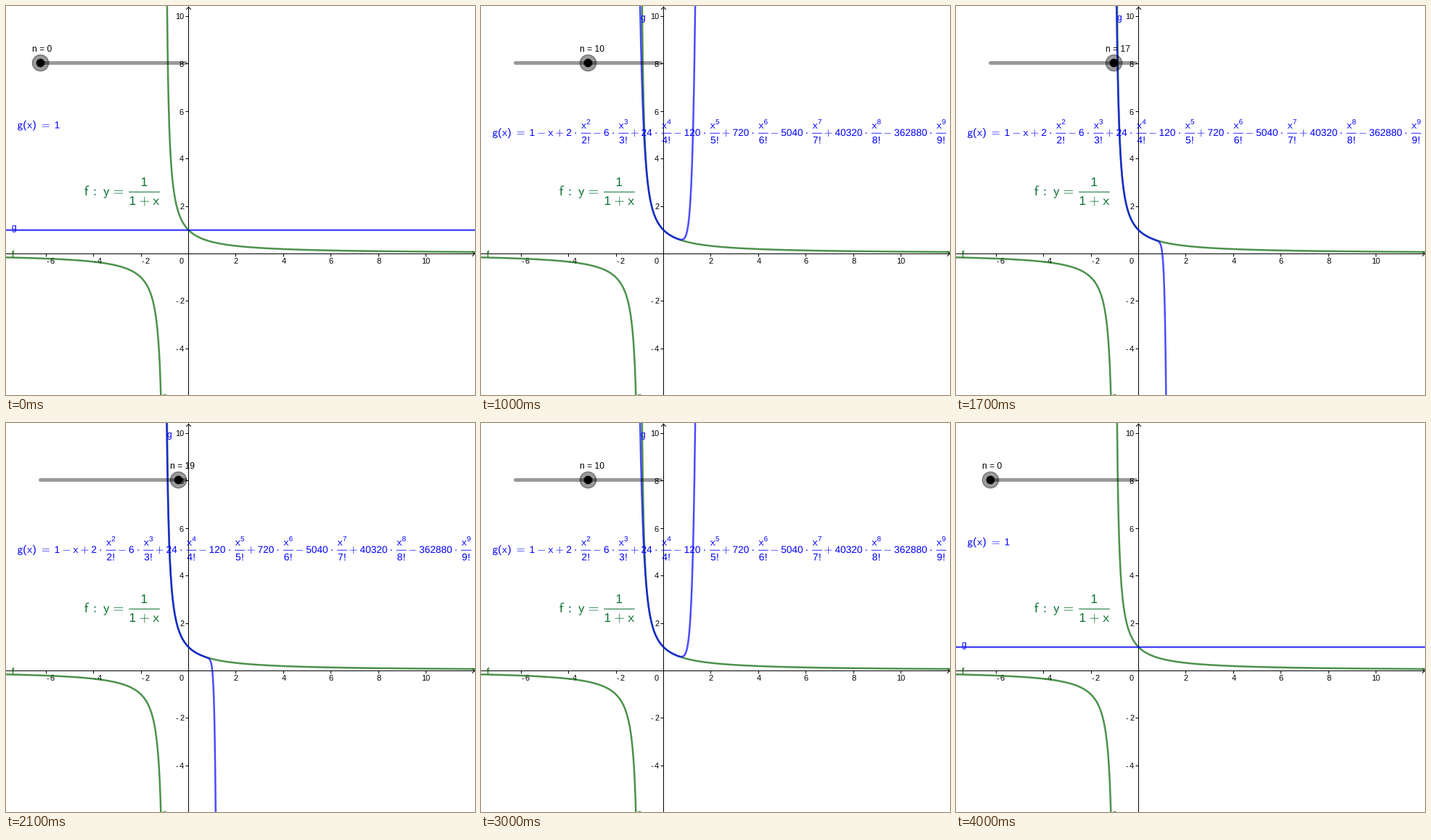
Recreate the animation shown at these times as a matplotlib script. Size 646x536 px, loop 4.1 s.

```python
import math

import matplotlib.pyplot as plt
import numpy as np
from matplotlib.animation import FuncAnimation
from matplotlib.patches import Circle, PathPatch
from matplotlib.textpath import TextPath
from matplotlib.transforms import Affine2D

plt.rcParams["mathtext.fontset"] = "cm"
plt.rcParams["font.family"] = "Liberation Sans"
plt.rcParams["path.snap"] = False

W, H, DPI = 646, 536, 100
PT = 72 / DPI                      # points per pixel
OX, OY, UNIT = 251.5, 341.5, 32.71  # origin and pixels per unit
N_MAX, LAST_TERM = 20, 9
GREEN, BLUE = (0, 100 / 255, 0), (0, 0, 1)
LABEL_GREEN = "#0b7030"

fig = plt.figure(figsize=(W / DPI, H / DPI), dpi=DPI, facecolor="white")
ax = fig.add_axes([0, 0, 1, 1])
ax.set_xlim(0, W)
ax.set_ylim(H, 0)
ax.axis("off")


def px(x):
    return OX + UNIT * x


def py(y):
    return OY - UNIT * y


def line(xs, ys, width=1.0, color="black", **kw):
    return ax.plot(xs, ys, color=color, lw=width * PT, **kw)[0]


def label(x, y, s, size, color="black", ha="left", z=3):
    return ax.text(x, y, s, fontsize=size * PT, color=color, ha=ha,
                   va="baseline", zorder=z)


def glyph(cx, base, s, size, color):
    """Outline of a symbol or number, its ink centred on cx."""
    if s[0].isdigit() or s in "()!":
        scale = 1.0 if s in "()" else 0.91
        path = TextPath((0, 0), s, size=scale * size)
    else:
        path = TextPath((0, 0), rf"$\mathsf{{{s}}}$", size=size)
    box = path.get_extents()
    shift = cx - (box.x0 + box.x1) / 2
    place = Affine2D().scale(1, -1).translate(shift, base) + ax.transData
    return ax.add_patch(PathPatch(path, transform=place, fc=color, lw=0,
                                  zorder=6))


def row(base, size, color, pieces):
    return [glyph(cx, base, s, size, color) for cx, s in pieces]


def frac_bar(cx, base, half, size, color):
    y = base - 0.25 * size
    return line([cx - half, cx + half], [y, y], 0.055 * size, color,
                zorder=6, solid_capstyle="butt")


def power_term(cx, base, k, size, color):
    """x^k / k! centred on cx."""
    top, bottom = base - 0.677 * size, base + 0.686 * size
    return [
        glyph(cx - 0.19 * size, top, "x", size, color),
        glyph(cx + 0.24 * size, top - 0.4 * size, str(k), 0.72 * size, color),
        glyph(cx - 0.15 * size, bottom, str(k), size, color),
        glyph(cx + 0.25 * size, bottom, "!", size, color),
        frac_bar(cx, base, 0.46 * size, size, color),
    ]


def draw_axes():
    line([0, W], [OY, OY], zorder=1)
    line([OX, OX], [1, H], zorder=1)
    line([OX - 3, OX, OX + 3], [4.5, 1.5, 4.5], zorder=1)
    line([W - 3.5, W - 0.5, W - 3.5], [OY - 3, OY, OY + 3], zorder=1)
    for v in range(-6, 11, 2):
        if v == 0:
            label(238.5, 355, "0", 11, z=1)
            continue
        x = math.floor(px(v)) + 0.5
        line([x, x], [OY, OY + 3.5], zorder=1)
        if v > 0:
            label(x, 355, str(v), 11, ha="center", z=1)
        else:
            label(x + 0.5, 355, "-", 11, z=1)
            label(x + 5, 355, str(-v), 11, z=1)
        if v < -4:
            continue
        y = math.floor(py(v)) + 0.5
        line([OX - 3.5, OX], [y, y], zorder=1)
        label(245, y + 4, str(abs(v)), 11, ha="right", z=1)
        if v < 0:
            label(233.5, y + 4, "-", 11, z=1)


def draw_hyperbola():
    for xs in (np.linspace(-7.8, -1.1, 1500), np.linspace(-0.92, 12.2, 3000)):
        line(px(xs), py(1 / (1 + xs)), 2.5, GREEN, alpha=0.7, zorder=2)
    label(8, 346, "f", 12, GREEN)
    line([217, 220], [535.5, 535.5], 1, GREEN, alpha=0.7)


def draw_f_formula():
    size, base, cx = 19, 261, 190.5
    row(base, size, LABEL_GREEN,
        [(111.3, "f"), (122.5, ":"), (138.3, "y"), (155, "=")])
    row(base - 0.677 * size, size, LABEL_GREEN, [(cx, "1")])
    row(base + 0.686 * size, size, LABEL_GREEN,
        [(cx - 16, "1"), (cx + 0.3, "+"), (cx + 16.3, "x")])
    frac_bar(cx, base, 21.3, size, LABEL_GREEN)


def g_formula(n):
    size, base = 15, 179 if n > 1 else 168.5
    pieces = [(19.6, "g"), (26.2, "("), (32.6, "x"), (38.8, ")"),
              (54.8, "="), (70.6, "1")]
    if n > 0:
        pieces += [(83.5, "-"), (96, "x")]
    parts = []
    cx = 144.5
    for k in range(2, min(n, LAST_TERM) + 1):
        coeff = str(math.factorial(k))
        width = 0.5 * size * len(coeff)
        if k > 2:
            cx += 44.2 + width
        left = cx - 19.6 - width
        pieces += [(left - 9.1, "-" if k % 2 else "+"),
                   (left + width / 2, coeff), (cx - 14.2, r"\cdot")]
        parts += power_term(cx, base, k, size, BLUE)
    return parts + row(base, size, BLUE, pieces)


def taylor(x, n):
    return sum((-x) ** k for k in range(n + 1))


def g_label(n):
    """Label sits where the curve enters the view from the left or top."""
    left, top = -OX / UNIT, OY / UNIT
    if taylor(left, n) < top:
        return label(8, round(py(taylor(left, n))), "g", 12, BLUE)
    xs = np.linspace(0, left, 8000)
    enter = np.interp(top, taylor(xs, n), xs)
    return label(round(px(enter) - 0.4), 20, "g", 12, BLUE)


def slider(n):
    x, y = 47.5 + 10 * n, 78.5
    grip = [Circle((x, y), 11.2, fc=(0, 0, 0, 0.4), ec=(0, 0, 0, 0.5),
                   lw=PT, zorder=8),
            Circle((x, y), 5.8, fc="black", lw=0, zorder=9)]
    for c in grip:
        ax.add_patch(c)
    return grip + [label(x - 11.5, 63, f"n = {n}", 12, z=9)]


draw_axes()
draw_hyperbola()
draw_f_formula()
line([47.5, 247.5], [78.5, 78.5], 5, alpha=0.4, zorder=7,
     solid_capstyle="round")

grid = np.linspace(-7.8, 12.2, 5000)
g_curve = line([], [], 2.5, BLUE, alpha=0.7, zorder=4)
moving = []


def draw(frame):
    n = N_MAX - abs(N_MAX - frame)
    while moving:
        moving.pop().remove()
    values = np.clip(taylor(grid, n) + 0 * grid, -200, 200)
    g_curve.set_data(px(grid), py(values))
    moving.extend(g_formula(n) + slider(n) + [g_label(n)])
    return [g_curve] + moving


anim = FuncAnimation(fig, draw, frames=2 * N_MAX + 1, interval=100,
                     init_func=lambda: [], repeat=True, repeat_delay=0,
                     blit=False)
plt.show()
```
